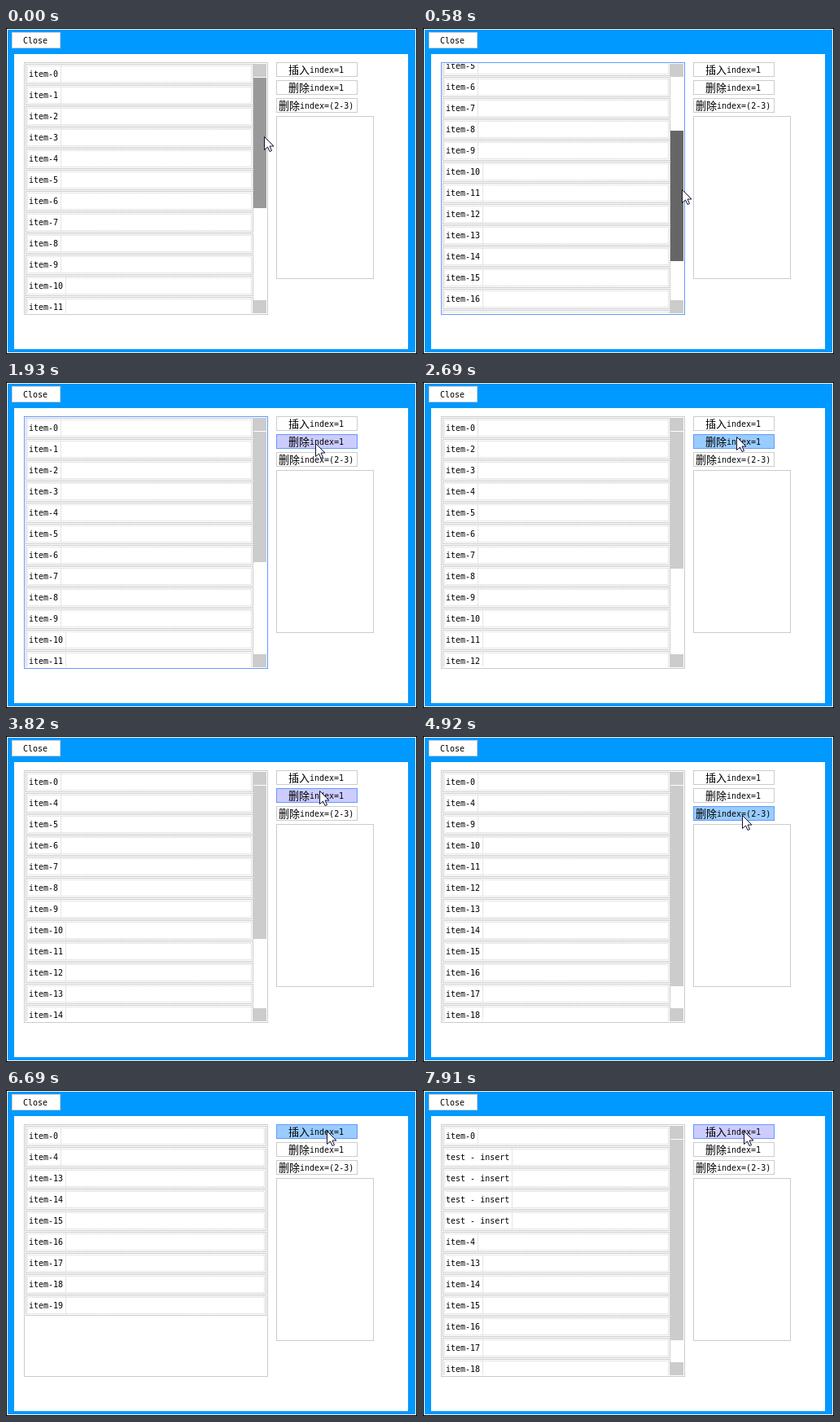
Write an HTML page with a canvas that moves like this. It is 505 px wide and 400 px high and loops after 8 s.

```html
<!DOCTYPE html>
<html lang="zh">
<head>
<meta charset="utf-8">
<title>List demo</title>
<style>
html, body { margin: 0; width: 100%; height: 100%; overflow: hidden; }
canvas { display: block; }
</style>
</head>
<body>
<canvas id="stage" width="505" height="400"></canvas>
<script>
const g = document.getElementById('stage').getContext('2d');
const LOOP = 8000, GREY = '#ccc', BLUE = '#69f';
const ROW = 26, VIEW = 306, TRACK = 273, GRAB = 133;
const MONO = '10px "DejaVu Sans Mono", monospace';
const CJK = '13px "Noto Sans CJK SC", "Noto Sans CJK", sans-serif';
const ARROW = new Path2D('M0 0V16L4 12.5L6.5 18L9 17L6.5 11.5H11.5Z');

const DRAG = { start: 100, end: 880 };

// The pointer rests between these eased moves
const MOVES = [
  { start: 130, end: 580, x: 318, y: 198 },
  { start: 700, end: 880, x: 318, y: GRAB },
  { start: 910, end: 1630, x: 378, y: 77 },
  { start: 1840, end: 2140, x: 385, y: 67 },
  { start: 3820, end: 4090, x: 392, y: 97 },
  { start: 6300, end: 6640, x: 394, y: 50 }
];

// Evenly spaced clicks; each one splices the list and lightens the button briefly
const FLASH = 110;
const VISITS = [
  { start: 2170, end: 3820, first: 2570, step: 350, count: 3, splice: [1, 1] },
  { start: 4120, end: 6300, first: 4370, step: 390, count: 4, splice: [2, 2] },
  { start: 6690, end: LOOP, first: 6780, step: 376, count: 4, splice: [1, 0, 'test - insert'] }
];

const BUTTONS = [['插入', 'index=1'], ['删除', 'index=1'], ['删除', 'index=(2-3)']];

const during = (t, { start, end }) => t >= start && t < end;

function pointerAt(t) {
  let x = 317, y = GRAB;
  for (const m of MOVES) {
    const u = Math.min(1, Math.max(0, (t - m.start) / (m.end - m.start)));
    const e = u * u * (3 - 2 * u);
    x += (m.x - x) * e;
    y += (m.y - y) * e;
  }
  return { x: Math.round(x), y: Math.round(y) };
}

const clicksBy = (t, v) =>
  Math.max(0, Math.min(v.count, Math.floor((t - v.first) / v.step) + 1));

function itemsAt(t) {
  const items = Array.from({ length: 20 }, (_, i) => 'item-' + i);
  for (const v of VISITS)
    for (let n = clicksBy(t, v); n > 0; n--) items.splice(...v.splice);
  return items;
}

function pressedAt(t) {
  const v = VISITS.find(v => during(t, v));
  if (!v) return false;
  const n = clicksBy(t, v);
  return n === 0 || t - v.first - (n - 1) * v.step >= FLASH;
}

function fill(color, x, y, w, h) {
  g.fillStyle = color;
  g.fillRect(x, y, w, h);
}

function frame(color, x, y, w, h) {
  g.strokeStyle = color;
  g.strokeRect(x + .5, y + .5, w - 1, h - 1);
}

function box(color, border, x, y, w, h) {
  fill(color, x, y, w, h);
  frame(border, x, y, w, h);
}

function text(s, x, y, font = MONO) {
  g.font = font;
  g.fillStyle = '#000';
  g.fillText(s, x, y);
}

function drawWindow() {
  box('#fff', '#000', 0, 0, 505, 400);
  fill('#09f', 2, 2, 501, 396);
  fill('#fff', 10, 32, 484, 362);
  box('#fff', GREY, 7, 5, 60, 20);
  text('Close', 21, 19);
  frame(GREY, 332, 108, 120, 200);
}

function drawRow(label, y, right) {
  frame(GREY, 24, y, right - 24, 25);
  g.setLineDash([1, 1]);
  g.lineDashOffset = .5; // keeps the dots on whole pixels
  frame(GREY, 26, y + 2, right - 28, 21);
  const x = 31.5 + 6 * label.length;
  g.beginPath();
  g.moveTo(x, y + 2.5);
  g.lineTo(x, y + 22.5);
  g.stroke();
  g.setLineDash([]);
  text(label, 28, y + 16);
}

function drawList(t, pointer) {
  const items = itemsAt(t);
  const content = items.length * ROW + 2, hasBar = content > VIEW;
  const dragging = during(t, DRAG);
  const shift = dragging ? pointer.y - GRAB : 0;
  const top = 44 - Math.round(shift * 140 / 65);

  g.save();
  g.beginPath();
  g.rect(23, 44, 298, VIEW);
  g.clip();
  items.forEach((label, i) => drawRow(label, top + i * ROW, hasBar ? 304 : 320));
  g.restore();

  if (hasBar) {
    const thumb = dragging ? '#666' : pointer.x < 321 ? '#999' : GREY;
    fill(GREY, 304, 44, 16, 16);
    fill(GREY, 304, 334, 16, 16);
    fill(thumb, 304, 61 + shift, 16, Math.round(TRACK * VIEW / content));
  }
  const focused = t >= DRAG.start && t < VISITS[0].start;
  frame(focused ? BLUE : GREY, 22, 42, 300, 310);
}

function drawButtons(t, pointer) {
  BUTTONS.forEach(([cjk, code], i) => {
    const y = 42 + 22 * i;
    const hot = pointer.x >= 332 && pointer.x < 432 && pointer.y >= y && pointer.y < y + 18;
    box(hot ? (pressedAt(t) ? '#9cf' : '#ccf') : '#fff', hot ? BLUE : GREY, 332, y, 100, 18);
    const x = 368 - 3 * code.length;
    text(cjk, x, y + 14, CJK);
    text(code, x + 26, y + 13);
  });
}

function drawPointer({ x, y }) {
  g.save();
  g.translate(x + .5, y + .5);
  g.fillStyle = '#fff';
  g.strokeStyle = '#113';
  g.fill(ARROW);
  g.stroke(ARROW);
  g.restore();
}

function draw(t) {
  const pointer = pointerAt(t);
  drawWindow();
  drawList(t, pointer);
  drawButtons(t, pointer);
  drawPointer(pointer);
}

const start = performance.now();
function tick() {
  draw((performance.now() - start) % LOOP);
  requestAnimationFrame(tick);
}
tick();
</script>
</body>
</html>
```
